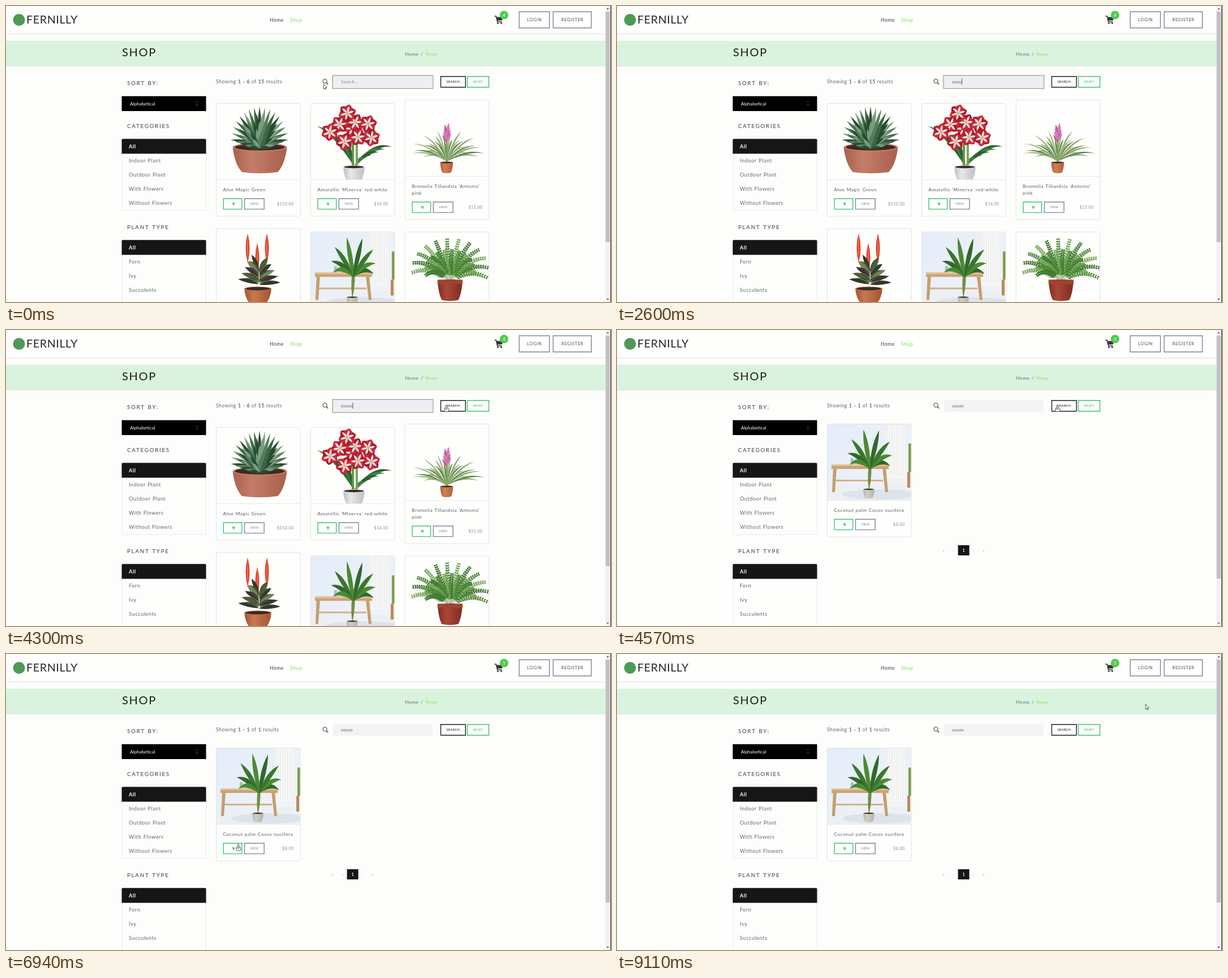
An HTML page with a canvas that plays this animation: 1069 px wide and 524 px high, repeating every 9.14 s.

```html
<!DOCTYPE html>
<html lang="en">
<head>
<meta charset="utf-8">
<title>Plant shop search</title>
<style>
html, body { margin: 0; width: 100%; height: 100%; overflow: hidden; background: #fdfdfb; }
canvas { display: block; }
</style>
</head>
<body>
<canvas id="stage" width="1069" height="524"></canvas>
<script>
const g = document.getElementById('stage').getContext('2d');
const INK = '#1c1c1c', GREY = '#62666b', GREEN = '#3fc274', LIME = '#94ea7e', STEEL = '#7d8699', LINE = '#e6e8ec';
const { PI, sin, cos, abs, min, max, hypot, atan2 } = Math;

// ---- timing ----
const LOOP = 9140, TYPE_AT = 1700, KEY_GAP = 280, WORD = 'cocos';
const SEARCHED = 4400, ADDED = 6850, SHOW_POINTER = 3650;
const MOVES = [
  { at: 3650, for: 500, x: 778, y: 133 },
  { at: 4850, for: 1150, x: 422, y: 314 },
  { at: 6270, for: 280, x: 402, y: 342 },
  { at: 6900, for: 550, x: 930, y: 9 },
  { at: 8000, for: 500, x: 934, y: 89 }
];

function pointer(t) {
  let x = 561, y = 138;
  for (const m of MOVES) {
    const k = min(1, max(0, (t - m.at) / m.for)), e = k * k * (3 - 2 * k);
    x += (m.x - x) * e;
    y += (m.y - y) * e;
  }
  return [x, y];
}

// ---- drawing helpers ----
const repeat = (n, fn) => { for (let i = 0; i < n; i++) fn(i); };

function box(x, y, w, h, c) { g.fillStyle = c; g.fillRect(x, y, w, h); }

function round(x, y, w, h, r, fill, stroke, lw = 1) {
  g.beginPath(); g.roundRect(x, y, w, h, r);
  if (fill) { g.fillStyle = fill; g.fill(); }
  if (stroke) { g.strokeStyle = stroke; g.lineWidth = lw; g.stroke(); }
}

function dot(x, y, rx, c, ry = rx) {
  g.fillStyle = c; g.beginPath(); g.ellipse(x, y, rx, ry, 0, 0, 7); g.fill();
}

function trace(...p) {
  g.beginPath();
  for (let i = 0; i < p.length; i += 2) g.lineTo(p[i], p[i + 1]);
}

function poly(c, ...p) { trace(...p); g.fillStyle = c; g.fill(); }

function line(c, lw, ...p) { trace(...p); g.strokeStyle = c; g.lineWidth = lw; g.stroke(); }

function text(s, x, y, size, c, gap = 0, weight = 400, align = 'left') {
  g.font = `${weight} ${size}px Lato, "Open Sans", sans-serif`;
  g.letterSpacing = gap + 'px';
  g.wordSpacing = size * 0.06 + 'px';
  g.textAlign = align; g.fillStyle = c;
  g.fillText(s, x, y);
  return x + g.measureText(s).width;
}

function button(label, x, y, w, h, size, c, ink = c, gap = 0, fill = null) {
  round(x + .7, y + .7, w - 1.4, h - 1.4, 0, fill, c, 1.4);
  text(label, x + w / 2 + gap / 2, y + h / 2 + size * .36, size, ink, gap, 400, 'center');
}

// ---- plant parts ----
function blade(x, y, tx, ty, w, c, lift = 0) {
  const d = hypot(tx - x, ty - y), nx = (y - ty) / d * w, ny = (tx - x) / d * w;
  const mx = (x + tx) / 2, my = (y + ty) / 2 - lift;
  g.fillStyle = c; g.beginPath(); g.moveTo(x, y);
  g.quadraticCurveTo(mx + nx, my + ny, tx, ty);
  g.quadraticCurveTo(mx - nx, my - ny, x, y);
  g.fill();
}

function pot(cx, top, w, h, dark, light) {
  const r = w / 2, shade = g.createLinearGradient(cx - r, 0, cx + r, 0);
  shade.addColorStop(0, dark); shade.addColorStop(.35, light); shade.addColorStop(1, dark);
  g.fillStyle = shade; g.beginPath();
  g.moveTo(cx - r, top);
  g.quadraticCurveTo(cx - r * .92, top + h * .7, cx - r * .66, top + h);
  g.quadraticCurveTo(cx, top + h * 1.1, cx + r * .66, top + h);
  g.quadraticCurveTo(cx + r * .92, top + h * .7, cx + r, top);
  g.fill();
  dot(cx, top, r, light, r * .16);
  dot(cx, top, r * .92, '#3b2a22', r * .12);
}

function flower(x, y, r, turn) {
  repeat(12, i => {
    const a = turn + i * PI / 3, k = i < 6 ? 1 : .8;
    blade(x, y, x + cos(a) * r * k, y + sin(a) * r * k, i < 6 ? 14 : 4, i < 6 ? (i % 2 ? '#c9293a' : '#a91d2c') : '#f5e3df');
  });
  dot(x, y, 2, '#b9c27a');
}

function frond(x, y, tx, ty, lift, c) {
  const mx = (x + tx) / 2, my = (y + ty) / 2 - lift;
  const on = (a, b, d, k) => (1 - k) ** 2 * a + 2 * k * (1 - k) * b + k * k * d;
  for (let k = .2; k < 1; k += .06) {
    const px = on(x, mx, tx, k), py = on(y, my, ty, k);
    const a = atan2(on(y, my, ty, k + .02) - py, on(x, mx, tx, k + .02) - px), r = 4 + 4 * (1 - k);
    for (const s of [-.9, .9]) blade(px, py, px + cos(a + s) * r, py + sin(a + s) * r, 3, c);
  }
  blade(x, y, tx, ty, 1, c, lift);
}

// ---- product pictures, in a 148 x 134 space ----
function aloe() {
  pot(76.5, 77, 96, 44, '#a8604d', '#c47d68');
  const tones = ['#284a33', '#3c6644', '#557f5a', '#7c9c7e'];
  repeat(5, ring => {
    const n = 17 - ring * 3, reach = 1 - ring * .16;
    repeat(n, i => {
      const a = -PI * (.01 + .98 * i / (n - 1));
      blade(76, 72 + ring * 2, 76 + cos(a) * 51 * reach, 66 + ring * 3 + sin(a) * 61 * reach, 6, tones[(ring + i) % 4], 2);
    });
  });
}

function amaryllis() {
  repeat(10, i => {
    const side = i % 2 ? 1 : -1, k = i >> 1;
    blade(77, 112, 77 + side * (66 - k * 12), 58 + side * 18 + k * 5, 6, i % 3 ? '#2b6233' : '#447f42', 26 - k * 4);
  });
  box(72, 54, 4, 56, '#5f9349'); box(79, 54, 4, 56, '#74a457');
  pot(76, 112, 38, 24, '#bcc0c3', '#e6e8e8');
  repeat(9, i => {
    const a = i * 2.4 + 2.6, r = 14.5 * Math.sqrt(i);
    flower(74 + cos(a) * r, 44 + sin(a) * r * .8, 16, i);
  });
}

function bromelia() {
  repeat(25, i => {
    const a = -PI * (.02 + .96 * i / 24), k = .78 + .22 * sin(i * 2.3);
    blade(73, 108, 73 + cos(a) * 72 * k, 94 + sin(a) * 46 * k + 8 * abs(cos(a)), 2.6, ['#8aa66c', '#5f8549', '#a3b985'][i % 3], 14);
  });
  box(72, 66, 3, 42, '#86a060');
  repeat(8, i => {
    const y = 70 - i * 3;
    blade(73.5, y + 6, 73.5 + (i % 2 ? 8 : -8) * (1 - i * .08), y - 9, 4, i % 3 ? '#d779b5' : '#bd5fa0');
  });
  pot(73, 110, 23, 18, '#b0603a', '#cf8055');
}

function vriesea() {
  repeat(3, i => {
    const x = 55 + i * 17, y = 8 + i % 2 * 17;
    line('#67813f', 2, 75, 94, x, y + 50);
    blade(x, y + 52, x, y, 7, '#d9412c');
    blade(x, y + 48, x, y + 4, 2, '#f0764a');
  });
  repeat(26, i => {
    const side = i % 2 ? 1 : -1, tier = i / 5;
    blade(75, 74 + tier * 5, 75 + side * (13 + tier * 5), 46 + tier * 9 + i % 3 * 4, 7,
      ['#2f3a2a', '#4c5f3a', '#43303a', '#6f8552'][(i >> 1) % 4], 3);
  });
  pot(73, 106, 48, 24, '#a3552f', '#c9774e');
}

function coconut() {
  const wall = g.createLinearGradient(0, 0, 148, 134);
  wall.addColorStop(0, '#e4ecf9'); wall.addColorStop(1, '#f2f4f6');
  box(0, 0, 148, 134, wall);
  box(104, 0, 32, 94, '#f8f8f6');
  repeat(8, i => box(105 + i * 4, 0, 1, 92, '#e4e7e8'));
  box(0, 104, 148, 30, '#eceff3');
  dot(92, 124, 66, '#dce3ea', 9);
  repeat(3, i => box(41 + i * 6.5, 60 + i % 2 * 2, 5, 12, i % 2 ? '#d7dcd8' : '#a3bec0'));
  for (const [x, foot] of [[10, 8], [97, 102]]) poly('#c49d70', x, 77, x + 6, 77, foot + 5, 120, foot, 120);
  box(14, 98, 84, 3, '#cfb18b');
  box(7, 71, 101, 3, '#dfc095'); box(7, 74, 101, 5, '#cba473');
  box(143, 34, 5, 50, '#7b9c4c'); box(141, 84, 5, 28, '#b98954');
  blade(73, 118, 76, 54, 6, '#768c43');
  repeat(8, i => {
    const a = -PI * (.07 + .84 * i / 7), r = 35 + 40 * sin(a) ** 2;
    blade(75, 80, 75 + cos(a) * r, 82 + sin(a) * r, 8, ['#2f6a29', '#4b8a35', '#3b772f'][i % 3], 4 + 16 * cos(a) ** 2);
  });
  pot(73, 115, 20, 15, '#b5b1ab', '#d0cdc8');
}

function fern() {
  repeat(24, i => {
    const a = -PI * (-.07 + 1.14 * i / 23), k = i % 2 ? .65 : 1;
    frond(77, 88, 79 + cos(a) * 67 * k, 68 + sin(a) * 56 * k, 22 * abs(cos(a)), ['#4f8a39', '#77a758', '#3d7731'][i % 3]);
  });
  pot(79, 87, 44, 33, '#7f2c20', '#a9483a');
  box(57, 84, 44, 8, '#a04232');
}

const SHELF = [
  { draw: aloe, name: ['Aloe Magic Green'], price: '$150.00' },
  { draw: amaryllis, name: ["Amaryllis 'Minerva' red-white"], price: '$14.00' },
  { draw: bromelia, name: ["Bromelia Tillandsia 'Antonio'", 'pink'], price: '$15.00' },
  { draw: vriesea }, { draw: coconut }, { draw: fern }
];
const FOUND = { draw: coconut, name: ['Coconut palm Cocos nucifera'], price: '$8.00' };

// ---- interface parts ----
function cart(x, y, s, c) {
  g.save(); g.translate(x, y); g.scale(s, s);
  line(c, 1.6, 0, 1, 3, 1, 5.2, 11, 13, 11);
  poly(c, 3, 2.6, 15, 2.6, 13.6, 8.6, 4.6, 9);
  dot(6, 13.6, 1.5, c); dot(12, 13.6, 1.5, c);
  g.restore();
}

function card(x, y, { draw, name = [''], price = '' }) {
  const h = 199.5 + (name.length - 1) * 12, b = y + h - 31.7;
  round(x, y, 148.5, h, 2, '#fefefd', '#dfe2e6');
  g.save();
  g.beginPath(); g.rect(x + .5, y + .5, 147.5, 134); g.clip();
  g.translate(x + .5, y + .5); draw();
  g.restore();
  box(x, y + 134.5, 148, 1, LINE);
  name.forEach((s, i) => text(s, x + 12, y + 155.2 + i * 12, 8.35, '#55595e', .56));
  button('', x + 12, b, 34, 20, 6, GREEN);
  cart(x + 27.5, b + 7.2, .38, GREEN);
  button('VIEW', x + 49.3, b, 36, 20, 5.9, STEEL);
  text(price, x + 137, b + 12.5, 7, '#858a92', .5, 400, 'right');
}

function list(y, items, bottom) {
  round(205, y, 148.5, bottom - y, 2, null, LINE);
  round(204.5, y, 149, 26.3, [2, 2, 0, 0], '#161616');
  items.forEach((s, i) => text(s, 217, y + 16.5 + i * 25, 9.2, i ? GREY : '#fff', .56, i ? 400 : 700));
}

function header(count, hover) {
  box(0, 0, 1059, 49, '#fefefd');
  box(0, 48.5, 1059, 2, '#ebebf5');
  dot(23, 24.5, 10.5, '#4d9a55');
  text('FERNILLY', 36, 31, 19.7, '#262626', .6);
  text('Home', 466, 27.5, 8.5, '#3a3d40', .56);
  text('Shop', 502, 27.5, 8.5, LIME, .56, 700);
  cart(863, 17, 1, '#363636');
  dot(880, 16, 7.6, '#4fcb50');
  text(count, 880, 18.8, 8, '#fff', 0, 400, 'center');
  button('LOGIN', 906, 9.5, 55, 30, 7.3, STEEL, '#45494f', .75, hover && '#eff0f1');
  button('REGISTER', 966, 9.5, 69, 30, 7.3, STEEL, '#45494f', .75);
  box(0, 61.5, 1059, 45.5, '#d9f3de');
  text('SHOP', 205, 89, 20, INK, 1.67);
  text('Home', 705, 87.6, 8.4, GREY, .56);
  text('/', 733, 87.6, 8.4, GREY);
  text('Shop', 741, 87.6, 8.4, LIME, .56, 700);
}

function sidebar() {
  const head = (s, y) => text(s, 214, y, 9.9, '#3b3e42', 1.67);
  head('SORT BY:', 139.7);
  box(204.5, 159.6, 149, 26.4, '#000');
  text('Alphabetical', 219, 175.6, 8.2, '#fff');
  for (const s of [-1, 1]) line('#77797c', .8, 335.6, 172.7 + s * 1.4, 337.4, 172.7 + s * 3.4, 339.2, 172.7 + s * 1.4);
  head('CATEGORIES', 216);
  list(235.2, ['All', 'Indoor Plant', 'Outdoor Plant', 'With Flowers', 'Without Flowers'], 362);
  head('PLANT TYPE', 395.2);
  list(414.3, ['All', 'Fern', 'Ivy', 'Succulents'], 560);
}

function searchBar(t, found) {
  let x = 371;
  const summary = found ? 'Showing |1 - 1| of |1| results' : 'Showing |1 - 6| of |15| results';
  summary.split('|').forEach((s, i) => { x = text(s, x, 137, 8.5, GREY, .56, i % 2 ? 700 : 400); });

  g.strokeStyle = '#333'; g.lineWidth = 1;
  g.beginPath(); g.arc(563.5, 133, 3.7, 0, 7); g.stroke();
  line('#333', 1.3, 566.2, 135.8, 569, 138.8);

  box(578, 124, 175.5, 20.5, found ? '#f2f3f5' : '#eeeff5');
  if (!found) round(577, 123, 177.5, 23, 0, null, '#bdbfad', 2);
  const typed = min(WORD.length, max(0, Math.floor((t - TYPE_AT) / KEY_GAP) + 1));
  const end = text(typed ? WORD.slice(0, typed) : 'Search...', 592, 137, 8.2, typed ? '#565a60' : '#8b9097');
  const idle = typed ? t - TYPE_AT - (typed - 1) * KEY_GAP : t + 530;
  if (!found && idle % 1060 < 530) box(typed ? end : 592, 128.5, .8, 11, '#333');

  button('SEARCH', 767.5, 124, 45, 20.5, 6.2, '#1d2027');
  button('RESET', 814.5, 124, 39.5, 20.5, 6.2, GREEN);
}

function results(found) {
  if (!found) {
    SHELF.forEach((p, i) => {
      const col = i % 3, top = i < 3 ? (col < 2 ? 172.5 : 166.5) : (col ? 400 : 394);
      card(371.5 + col * 166.8, top, p);
    });
    return;
  }
  card(371.5, 166.5, FOUND);
  box(602.5, 381, 20, 18, '#161616');
  [...'«‹1›»'].forEach((s, i) =>
    text(s, 577.3 + i * 17.6, 392.5, 7, i === 2 ? '#fff' : '#9a9fa8', 0, i === 2 ? 700 : 400, 'center'));
}

function scrollbar(found) {
  box(1059, 0, 9, 524, '#f1f1f1');
  box(1059.5, 10, 7.5, found ? 430 : 408, '#c1c1c1');
  poly('#555', 1061, 6, 1063.2, 3.6, 1065.4, 6);
  poly('#555', 1061, 518, 1063.2, 520.4, 1065.4, 518);
  box(1068, 0, 1, 524, '#222');
}

function cursor(x, y, hand) {
  g.save(); g.translate(x, y);
  g.lineJoin = 'round';
  if (hand) {
    round(-3.5, 5, 8, 6.5, 2, '#fff', '#2b2b2b', .8);
    round(-1.2, 0, 2.4, 8, 1.2, '#fff', '#2b2b2b', .8);
  } else {
    trace(0, 0, 0, 9, 2, 7.2, 3.3, 10, 4.6, 9.4, 3.4, 6.6, 6, 6.4);
    g.closePath();
    g.fillStyle = '#fff'; g.fill();
    g.strokeStyle = '#2b2b2b'; g.lineWidth = .8; g.stroke();
  }
  g.restore();
}

function draw(t) {
  const found = t >= SEARCHED, [x, y] = pointer(t);
  const over = (l, top, w, h) => x >= l && x <= l + w && y >= top && y <= top + h;
  const login = over(906, 8, 55, 31);
  const hand = login || over(768, 124, 44, 20) || (found && over(384, 334, 73, 20));
  box(0, 0, 1069, 524, '#fdfdfb');
  header(t < ADDED ? '4' : '5', login);
  sidebar();
  searchBar(t, found);
  results(found);
  scrollbar(found);
  if (t < TYPE_AT || t > SHOW_POINTER) cursor(x, y, hand);
}

const start = performance.now();
function tick(now) {
  draw(max(0, now - start) % LOOP);
  requestAnimationFrame(tick);
}
draw(0);
requestAnimationFrame(tick);
</script>
</body>
</html>
```
